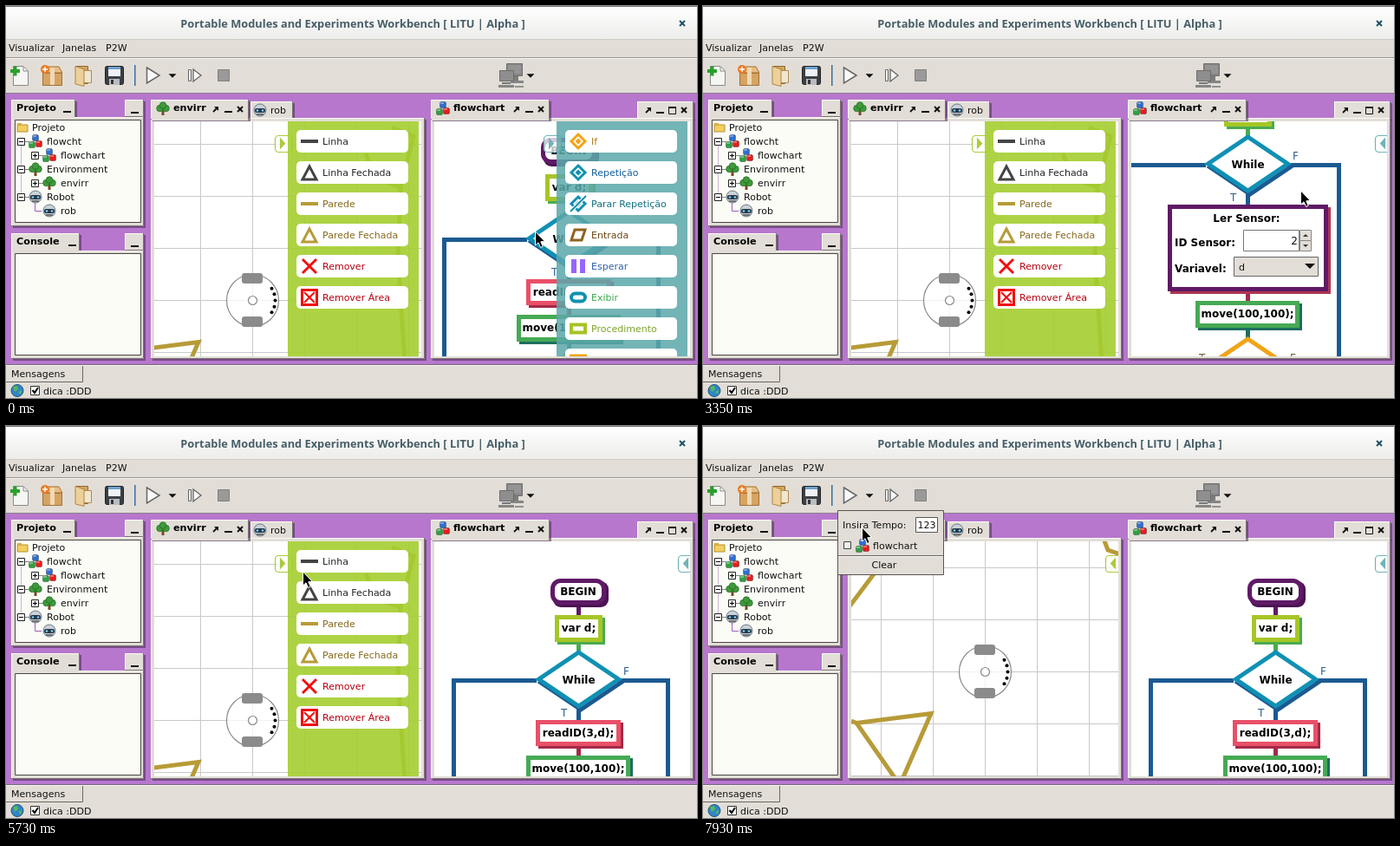
An HTML page with a canvas for the animation above (8 s loop, 797 px wide and 452 px high).

```html
<!DOCTYPE html>
<html lang="pt">
<head>
<meta charset="utf-8">
<style>
html, body { margin: 0; width: 100%; height: 100%; overflow: hidden; background: #e2ded7; }
canvas { display: block; }
</style>
</head>
<body>
<canvas id="stage" width="797" height="452"></canvas>
<script>
const c = document.getElementById('stage').getContext('2d');
const BG = '#e2ded7', DARK = '#4a4844', PURPLE = '#b777cd', BLUE = '#1b5a91', WALL = '#b79b38';
const LOOP = 8000;

// drawing helpers
function box(x, y, w, h, fill, stroke, lw = 1, r = 0) {
  c.beginPath();
  c.roundRect(x, y, w, h, r);
  if (fill) { c.fillStyle = fill; c.fill(); }
  if (stroke) { c.strokeStyle = stroke; c.lineWidth = lw; c.stroke(); }
}
function path(pts, stroke, lw = 1, fill, closed) {
  c.beginPath();
  for (let i = 0; i < pts.length; i += 2) c.lineTo(pts[i], pts[i + 1]);
  if (closed || (fill && !stroke)) c.closePath();
  if (fill) { c.fillStyle = fill; c.fill(); }
  if (stroke) { c.strokeStyle = stroke; c.lineWidth = lw; c.stroke(); }
}
function disc(x, y, r, fill, stroke, lw = 1) {
  c.beginPath();
  c.arc(x, y, r, 0, 7);
  if (fill) { c.fillStyle = fill; c.fill(); }
  if (stroke) { c.strokeStyle = stroke; c.lineWidth = lw; c.stroke(); }
}
function text(s, x, y, color = '#111', font = '11px', align = 'left', family = '"DejaVu Sans"') {
  c.font = `${font} ${family}, sans-serif`;
  c.fillStyle = color;
  c.textAlign = align;
  c.fillText(s, x, y);
}
const bold = (s, x, y, size = 12, align = 'center', color = '#000') => text(s, x, y, color, `bold ${size}px`, align);
const diamond = (x, y, w, h) => [x, y - h, x + w, y, x, y + h, x - w, y];
function at(x, y, draw) { c.save(); c.translate(x, y); draw(); c.restore(); }
function clip(x, y, w, h, draw) {
  c.save();
  c.beginPath(); c.rect(x, y, w, h); c.clip();
  draw();
  c.restore();
}

// timing helpers
const ease = u => u * u * (3 - 2 * u);
const ramp = (t, a, b) => ease(Math.min(1, Math.max(0, (t - a) / (b - a))));
function follow(keys, t) {
  let i = keys.findIndex(k => k[0] > t);
  if (i < 0) return keys[keys.length - 1].slice(1);
  if (i === 0) return keys[0].slice(1);
  const [a, b] = [keys[i - 1], keys[i]], u = ramp(t, a[0], b[0]);
  return [a[1] + (b[1] - a[1]) * u, a[2] + (b[2] - a[2]) * u].map(Math.round);
}

const pointerKeys = [
  [940, 610, 261], [1630, 632, 137], [1760, 632, 137], [1900, 628, 154], [2180, 628, 154],
  [2560, 652, 322], [2760, 652, 322], [3100, 710, 300], [3140, 710, 300], [3380, 688, 210],
  [3500, 696, 241], [3590, 695, 259], [3810, 695, 259], [4080, 721, 140], [4340, 693, 192],
  [4440, 693, 192], [4600, 718, 200], [4660, 718, 200], [5000, 751, 314], [5440, 379, 172],
  [5720, 342, 169], [5770, 342, 169], [6050, 317, 152], [6310, 317, 152], [6580, 364, 224],
  [6640, 364, 224], [6880, 405, 168], [6930, 405, 168], [7040, 296, 106], [7320, 191, 78],
  [7850, 191, 73], [7930, 183, 118]
];
const chartKeys = [[3140, 649, 268], [3380, 627, 178], [4660, 627, 178], [5000, 660, 292]];
const robotKeys = [[6640, 284, 339], [6880, 325, 283]];

// small icons, centred on x, y
const icons = {
  cubes(x, y) {
    for (const [dx, dy, f] of [[-4, -8, '#2f6fd0'], [-8, 0, '#2ea043'], [0, -1, '#e81c1c']]) {
      box(x + dx + .5, y + dy + .5, 7, 7, f, 'rgba(0,0,0,.3)', 1, 1.5);
      box(x + dx + 1, y + dy + 1, 4, 2, 'rgba(255,255,255,.35)');
    }
  },
  tree(x, y) {
    box(x - 1.5, y + 1, 3, 7, '#7a4a20');
    for (const [dx, dy] of [[-3.5, 0], [3.5, 0], [0, -3.5]]) disc(x + dx, y + dy, 3.8, '#3f9a3a', '#1f6a24', .7);
  },
  robot(x, y) {
    disc(x, y, 7, '#c9d2d8', '#6d7a84');
    box(x - 6, y - 2, 12, 5, '#26384a', null, 1, 2);
    disc(x - 3, y + .5, 1.3, '#7fd0f0');
    disc(x + 3, y + .5, 1.3, '#7fd0f0');
    path([x - 4, y + 5, x + 4, y + 5], '#555', 1.5);
  }
};

const arrowDown = (x, y, s = 4.5, f = '#111') => path([x - s, y - s / 2, x + s, y - s / 2, x, y + s / 2], null, 1, f);

// window button glyphs centred on x, y
const glyphs = {
  '_': (x, y) => box(x - 4, y + 2, 9, 2, '#111'),
  'o': (x, y) => { box(x - 3.5, y - 3.5, 8, 8, null, '#111'); box(x - 4, y - 4, 9, 2, '#111'); },
  'x': (x, y) => { path([x - 3, y - 3, x + 3, y + 3], '#111', 2); path([x + 3, y - 3, x - 3, y + 3], '#111', 2); },
  '^': (x, y) => { path([x - 3, y + 3, x + 2, y - 2], '#111', 1.8); path([x - 2, y - 3, x + 3, y - 3, x + 3, y + 2], null, 1, '#111'); }
};
function raised(x, y, w, h) {
  box(x + 2, y + 2, w, h, 'rgba(70,40,80,.55)');
  box(x, y, w, h, BG);
  path([x + .5, y + h, x + .5, y + .5, x + w, y + .5], '#fbfaf6');
  path([x + w - .5, y, x + w - .5, y + h - .5, x, y + h - .5], '#77736c');
}
function tab(x, y, w, h, label, labelX, marks) {
  raised(x, y, w, h);
  bold(label, labelX, y + 13, 11.2, 'left');
  marks.forEach(([g, gx]) => glyphs[g](gx, y + 11));
}
function sunken(x, y, w, h) { box(x + .5, y + .5, w, h, '#fcfcf7', DARK); }

function drawToolbar() {
  const grad = c.createLinearGradient(0, 0, 0, 39);
  grad.addColorStop(0, '#ffffff');
  grad.addColorStop(1, '#ececea');
  box(0, 0, 797, 39, grad);
  box(0, 0, 797, 1, '#777');
  box(0, 38, 797, 1, '#cfccc6');
  text('Portable Modules and Experiments Workbench [ LITU | Alpha ]', 400, 25, '#465e67', 'bold 12.8px', 'center', '"Open Sans"');
  path([777, 17, 783, 23], '#1e5368', 2);
  path([783, 17, 777, 23], '#1e5368', 2);
  text('Visualizar', 3, 52); text('Janelas', 65, 52); text('P2W', 115, 52);
  box(0, 59, 797, 1, '#9a968f');
  box(0, 60, 797, 1, '#f6f4ef');

  path([8.5, 69.5, 20, 69.5, 25.5, 75, 25.5, 91.5, 8.5, 91.5], '#888', 1, '#f6f7f5', true);
  path([20, 70, 20, 75, 25, 75], '#888');
  box(5, 73, 11, 4, '#2aa02a'); box(8.5, 69.5, 4, 11, '#2aa02a');

  path([42, 77, 46, 70, 61, 70, 65, 77], '#a8742c', 1, '#e6bd84', true);
  box(42.5, 77.5, 22, 14, '#d6a361', '#a0703a');
  box(51, 71, 5, 20, '#efd9b4');
  disc(45, 73, 5, '#ee7a22');
  path([42, 73, 48, 73], '#fff', 1.5); path([45, 70, 45, 76], '#fff', 1.5);

  box(80.5, 69.5, 14, 20, '#d3a45c', '#8f6a30');
  box(87.5, 74.5, 11, 14, '#f0e6cf', '#b08a50');
  path([80, 69.5, 90, 73, 90, 92.5, 80, 90], '#b08444', 1, '#ecd09a', true);

  box(114.5, 69.5, 21, 21, '#3c4044', '#222', 1, 2);
  box(118, 70, 14, 11, '#eef2f4'); box(118, 70, 14, 3, '#6fa0d0');
  box(119, 84, 12, 7, '#b9bdc0'); box(121, 85, 3, 5, '#333');

  box(148, 68, 1.5, 24, '#3a6ea0');
  path([162.5, 71, 177, 80, 162.5, 89], '#666', 1.5, '#f8f8f8', true);
  arrowDown(192, 80.5);
  box(210.5, 73.5, 3, 13, '#eee', '#666');
  path([216, 73, 225, 80, 216, 87], '#666', 1.3, '#f8f8f8', true);
  box(244.5, 73.5, 13, 13, '#9a9a9a', '#808080');
  box(577.5, 66.5, 18, 14, '#858585', '#707070'); box(579, 68, 15, 10, '#949494');
  box(585, 81, 6, 5, '#7c7c7c'); box(582, 86, 15, 3, '#858585');
  box(569.5, 74.5, 16, 12, '#8e8e8e', '#6c6c6c'); box(572, 88, 10, 2, '#777');
  box(568, 91, 18, 3, '#858585');
  path([587, 93, 597, 93], '#777', 1.5);
  arrowDown(605, 80.5);
  box(0, 100, 797, 1, '#8b7f8e');
}

function drawSidebar() {
  tab(6, 108, 74, 21, 'Projeto', 12, [['_', 70]]);
  raised(137, 108, 22, 20); glyphs._(148, 120);
  raised(6, 128, 153, 126);
  box(7, 127, 72, 3, BG);
  sunken(10, 131, 145, 118);
  box(13, 137, 12, 8, '#f3cf62', '#b8902c'); box(13, 135, 5, 2, '#d9ae40');
  text('Projeto', 30, 144);
  path([17.5, 160, 17.5, 220], '#c9b4d8');
  path([33.5, 226, 33.5, 236.5, 41, 236.5], '#a05cc0');
  const rows = [['flowcht', 'cubes', 0], ['flowchart', 'cubes', 1], ['Environment', 'tree', 0],
    ['envirr', 'tree', 1], ['Robot', 'robot', 0], ['rob', 'robot', 1]];
  rows.forEach(([label, icon, deep], i) => {
    const y = 156 + 16 * i, x = 17 + 16 * deep;
    if (i < 5) {
      path([x + 5, y + .5, x + 10, y + .5], '#888');
      box(x - 3.5, y - 3.5, 8, 8, '#fff', '#222');
      box(x - 2, y, 5, 1, '#000');
      if (deep) box(x, y - 2, 1, 5, '#000');
    }
    icons[icon](x + 17, y);
    text(label, x + 30, y + 4);
  });
  tab(6, 262, 79, 21, 'Console', 12, [['_', 76]]);
  raised(137, 262, 22, 20); glyphs._(148, 274);
  raised(6, 282, 153, 125);
  box(7, 281, 77, 3, BG);
  sunken(10, 285, 145, 117);
}

function drawFooter() {
  box(0, 413, 797, 39, BG);
  box(0, 413, 797, 1, '#7a6a80');
  box(0, 414, 797, 1, '#f6f4ef');
  path([88.5, 415, 88.5, 433.5, 0, 433.5], '#6b6761');
  text('Mensagens', 6, 428);
  disc(13, 443.5, 7, '#2f86c8', '#28567a');
  path([8, 439, 13, 438, 14, 442, 10, 445], null, 1, '#58b858');
  path([14, 445, 18, 443, 17, 448], null, 1, '#58b858');
  box(28.5, 438.5, 10, 10, '#fff', '#333');
  path([30.5, 443, 33, 446, 37, 440], '#000', 2);
  text('dica :DDD', 43, 448);
}

// sliding tool palettes
function drawPalette(x, fill, accent, items, open) {
  box(x - 14.5, 149.5, 20, 19, 'rgba(255,255,255,.75)', accent, 1.2, 4);
  const s = open ? 1 : -1;
  path([x - 6 - 2.5 * s, 153, x - 6 + 2.5 * s, 158.5, x - 6 - 2.5 * s, 164], accent, 1.2, accent, true);
  box(x, 133, 151, 271, fill);
  items.forEach(([label, color, icon], i) => {
    const y = 143 + 36 * i;
    box(x + 10, y, 129, 26, '#fff', null, 1, 5);
    at(x + 25, y + 13, icon);
    text(label, x + 40, y + 17, color);
  });
}
const bar = f => () => box(-10, -2, 20, 4, f);
const tri = f => () => path([0, -7, 8, 8, -8, 8], f, 3, null, true);
const cross = (s, lw) => { path([-s, -s, s, s], '#f01010', lw); path([s, -s, -s, s], '#f01010', lw); };
const rhomb = (f, slash) => () => {
  path(diamond(0, 0, 8, 8), f, 3, '#fff', true);
  path(diamond(0, 0, 3.5, 3.5), null, 1, f);
  if (slash) { path([-8, 8, 8, -8], '#fff', 4); path([-9, 9, 9, -9], f, 2); }
};
const envItems = [
  ['Linha', '#222', bar('#444')],
  ['Linha Fechada', '#222', tri('#444')],
  ['Parede', '#86691c', bar(WALL)],
  ['Parede Fechada', '#86691c', tri(WALL)],
  ['Remover', '#b40010', () => cross(8, 3)],
  ['Remover Área', '#b40010', () => { box(-8.5, -8.5, 17, 17, null, '#f01010', 3); cross(6, 2.2); }]
];
const flowItems = [
  ['If', '#b07a1c', rhomb('#f0a418')],
  ['Repetição', '#14609a', rhomb('#1090b0')],
  ['Parar Repetição', '#0f7080', rhomb('#1090b0', true)],
  ['Entrada', '#6b4414', () => path([-4, -6, 8, -6, 4, 6, -8, 6], '#8f6420', 3, null, true)],
  ['Esperar', '#2b5fa8', () => { box(-8, -8, 6, 16, '#9766ff'); box(2, -8, 6, 16, '#9766ff'); }],
  ['Exibir', '#3ca84c', () => box(-8, -4.5, 16, 9, null, '#1090b0', 4, 4.5)],
  ['Procedimento', '#7fa32a', () => box(-8, -4.5, 16, 9, null, '#a4c424', 4)],
  ['Se', '#b07a1c', () => box(-8, -4.5, 16, 9, null, '#f0a418', 4)]
];

function drawEnvironment(t) {
  const [rx, ry] = follow(robotKeys, t);
  at(rx, ry, () => {
    for (let k = -8; k <= 8; k++) {
      box(60 * k, -400, 1, 800, '#c9c9c9');
      box(-400, 60 * k, 800, 1, '#c9c9c9');
    }
    path([-165, -155, -120, -123, -165, -63], WALL, 5);
    path([-148, 59.5, -62, 48.5, -98, 131], WALL, 5, null, true);
    path([-154, 57, -148, 59.5], WALL, 5);
    path([131, -169, 142, -140, 171, -130, 168, -49, 176, 71], WALL, 5);
    path([161, -199, 186, -189, 171, -130], WALL, 5);
    at(.5, .5, () => {
      disc(0, 0, 30, 'rgba(255,255,255,.75)', '#8a8a8a', 1.2);
      box(-12.5, -31.5, 24, 12, '#8b8b8b', null, 1, 3);
      box(-12.5, 18.5, 24, 12, '#8b8b8b', null, 1, 3);
      disc(0, 0, 5, '#fff', '#8a8a8a', 1.2);
      for (let k = -2; k <= 2; k++) disc(26 * Math.cos(k * .28), 26 * Math.sin(k * .28), 2, '#000');
    });
  });
  const slide = ramp(t, 6280, 6560);
  drawPalette(Math.round(325 + 154 * slide), 'rgba(165,207,48,.9)', '#a9cc3c', envItems, slide < .5);
}

// outlined flowchart block with an offset shadow; y is the top edge
function block(x, y, w, h, color, shade, label, r = 0, lw = 5) {
  const d = lw / 2;
  box(x - w / 2 + 3, y + 3, w, h, shade, null, 1, r);
  box(x - w / 2 + d, y + d, w - lw, h - lw, '#fff', color, lw, r);
  if (label) bold(label, x, Math.floor(y + h / 2) + 4);
}
function decision(y, color, shade, label) {
  path(diamond(3, y + 4, 46, 31), shade, 5, null, true);
  path(diamond(.5, y, 46, 31), color, 5, '#fff', true);
  bold(label, .5, y + 5);
}
function drawSensorForm(t) {
  block(.5, 47, 185, 100, '#5f1a66', '#ad3650');
  bold('Ler Sensor:', -1, 67);
  bold('ID Sensor:', -84, 95, 12, 'left');
  box(-4.5, 76.5, 64, 24, '#fff', '#777');
  text(t < 3820 ? '2' : '3', 58, 93, '#111', '12px', 'right');
  box(60.5, 76.5, 13, 12, BG, '#888');
  box(60.5, 88.5, 13, 12, BG, '#888');
  path([64, 84, 70, 84, 67, 81], null, 1, '#333');
  arrowDown(67, 94.5, 3, '#333');
  bold('Variavel:', -84, 125, 12, 'left');
  box(-15.5, 107.5, 97, 22, BG, '#666');
  text('d', -10, 123);
  arrowDown(72, 118, 6);
}
function drawChart(t) {
  const [x, y] = follow(chartKeys, t), open = t >= 2780 && t < 4000;
  const right = open ? 105.5 : 103.5;
  at(x, y, () => {
    path([-48, 1.5, -143.5, 1.5, -143.5, 500], BLUE, 5);
    path([48, 1.5, right, 1.5, right, 500], BLUE, 5);
    path([.5, -87, .5, -72], '#5f1a66', 5);
    path([.5, -45, .5, -28], '#4bab50', 5);
    path([.5, 30, .5, 49], BLUE, 5);
    block(0, -116, 64, 30, '#5f1a66', '#4d1254', 'BEGIN', 9);
    block(.5, -74, 55, 31, '#a6c626', '#4bab50', 'var d;');
    decision(0, '#1090b4', BLUE, 'While');
    text('F', 52, -5, '#2f5f90', '12px');
    text('T', -20, 43, '#2f5f90', '12px');
    c.save();
    if (open) c.translate(0, 70);
    path([.5, 76, .5, 90], '#a32a48', 5);
    path([.5, 118, .5, 136], '#1e6e60', 5);
    path([-46, 163.5, -76.5, 163.5, -76.5, 206], '#8c6a26', 5);
    path([46, 163.5, 56.5, 163.5, 56.5, 206], '#8c6a26', 5);
    block(0, 88, 120, 31, '#46aa54', '#1e6e60', 'move(100,100);');
    decision(163, '#f0a418', '#8c6a26', 'd<70');
    text('T', -56, 158, '#6d5c3c', '12px');
    text('F', 49, 158, '#6d5c3c', '12px');
    block(-77, 202, 110, 31, '#46aa54', '#1e6e60', 'move(80,-80);');
    block(57, 202, 70, 31, '#cacaca', '#9c9c9c', null, 9, 6);
    bold('-', 57, 221, 12, 'center', '#888');
    c.restore();
    if (open) drawSensorForm(t);
    else block(0, 47, 98, 30, '#e94f68', '#a32a48', 'readID(3,d);');
  });
  const slide = ramp(t, 1960, 2280);
  drawPalette(Math.round(635 + 155 * slide), 'rgba(92,168,170,.86)', '#6fb4b8', flowItems, slide < .5);
}

function drawPopup() {
  box(155.5, 97.5, 122, 74, BG, '#5a5650');
  text('Insira Tempo:', 161, 118);
  box(245.5, 105.5, 25, 17, '#fff', '#555');
  text('123', 247.5, 118);
  box(162.5, 133.5, 8, 8, '#eee', '#444');
  icons.cubes(184, 138);
  text('flowchart', 196, 142);
  box(156, 149, 121, 1, '#6b6761');
  box(156, 150, 121, 1, '#f8f6f2');
  text('Clear', 209, 164, '#111', '11px', 'center');
}

function render(t) {
  box(0, 0, 797, 452, BG);
  drawToolbar();
  box(0, 101, 797, 312, PURPLE);
  drawSidebar();

  raised(282, 110, 49, 20);
  icons.robot(293, 120);
  text('rob', 305, 124);
  raised(167, 129, 316, 278);
  tab(167, 108, 113, 23, 'envirr', 193, [['^', 242], ['_', 256], ['x', 270]]);
  box(168, 128, 111, 4, BG);
  icons.tree(181, 118);
  box(171, 133, 308, 271, '#fff');
  clip(171, 133, 308, 271, () => drawEnvironment(t));

  raised(728, 110, 65, 20);
  [['^', 741], ['_', 754], ['o', 768], ['x', 782]].forEach(([g, x]) => glyphs[g](x, 120));
  raised(490, 129, 303, 278);
  tab(490, 108, 137, 23, 'flowchart', 516, [['^', 589], ['_', 603], ['x', 617]]);
  box(491, 128, 135, 4, BG);
  icons.cubes(504, 118);
  box(494, 133, 295, 271, '#fff');
  clip(494, 133, 295, 271, () => drawChart(t));

  drawFooter();
  if (t >= 7480) drawPopup();
  const [px, py] = follow(pointerKeys, t);
  at(px, py - 1, () =>
    path([.5, 0, .5, 16, 4, 12.8, 6.6, 18.5, 9.2, 17.3, 6.8, 11.8, 11.5, 11.5], '#fff', 1, '#000', true));
}

function tick() {
  render(performance.now() % LOOP);
  requestAnimationFrame(tick);
}
tick();
</script>
</body>
</html>
```
